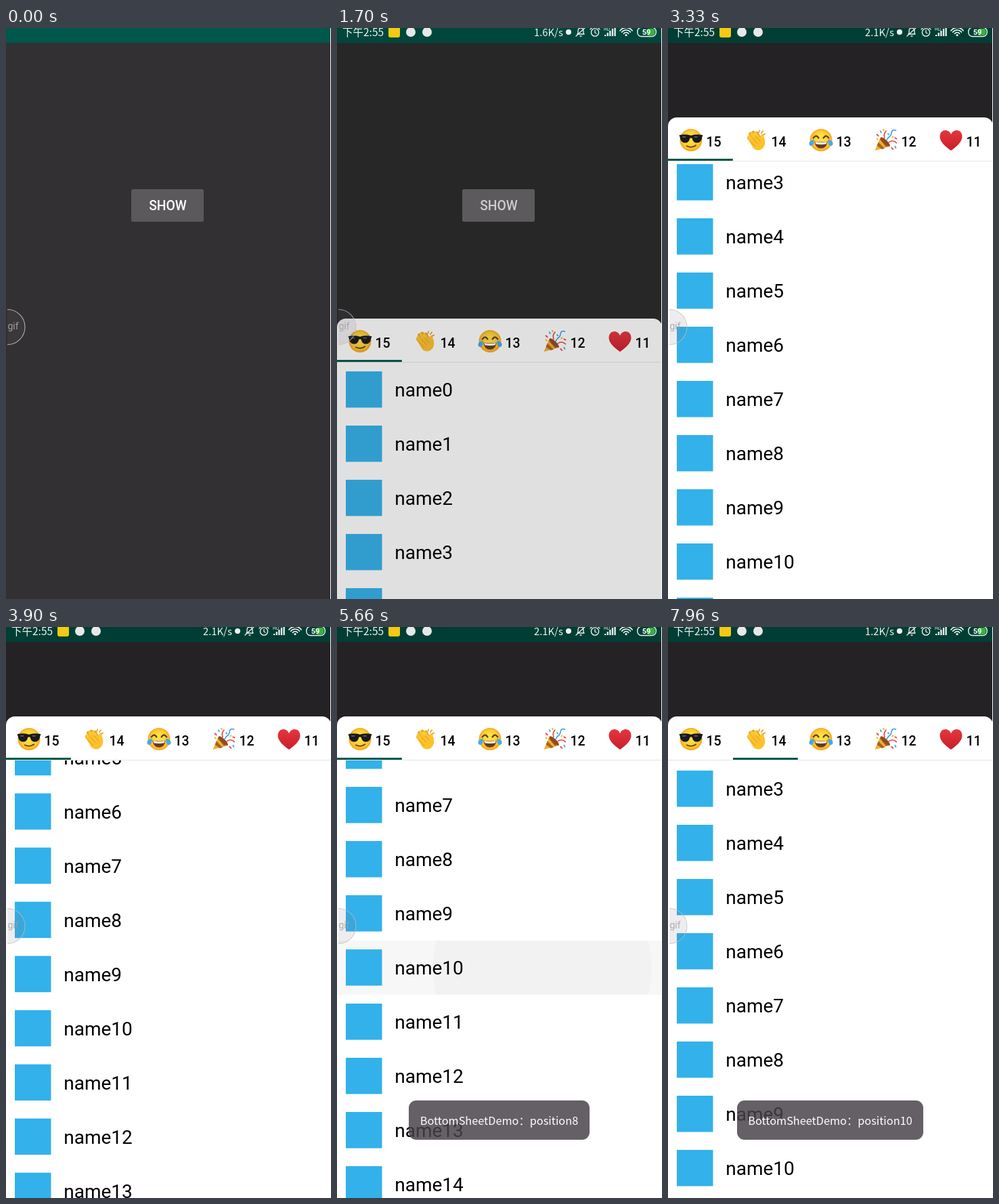
These frames come from a looping animation (480x843 px, 8 s). An HTML page with a canvas:

```html
<!DOCTYPE html>
<html lang="en">
<head>
<meta charset="utf-8">
<title>Bottom sheet demo</title>
<style>
html, body { margin: 0; width: 100%; height: 100%; overflow: hidden; background: #323032; }
canvas { display: block; width: 480px; height: 843px; }
</style>
</head>
<body>
<canvas id="stage"></canvas>
<script>
const W = 480, H = 843, LOOP = 8000;
const canvas = document.getElementById('stage');
const dpr = window.devicePixelRatio || 1;
canvas.width = W * dpr;
canvas.height = H * dpr;
const c = canvas.getContext('2d');

const ROBOTO = 'Roboto, sans-serif';
const CJK = '"Noto Sans CJK SC", "Noto Sans CJK", "Noto Sans", sans-serif';
const BG = '#323032', PRIMARY = '#00574b', DIM = 0.29;
const HEADER = 65, ROW = 80, ROWS = 15;
const COUNTS = [15, 14, 13, 12, 11];

const clamp = (x, a = 0, b = 1) => Math.min(b, Math.max(a, x));
const ramp = (t, a, b) => clamp((t - a) / (b - a));
const smooth = x => x * x * (3 - 2 * x);

// Eased value through [time, value] stops
function track(t, stops) {
  if (t <= stops[0][0]) return stops[0][1];
  for (let i = 1; i < stops.length; i++) {
    const [t0, v0] = stops[i - 1], [t1, v1] = stops[i];
    if (t < t1) return v0 + (v1 - v0) * smooth((t - t0) / (t1 - t0));
  }
  return stops[stops.length - 1][1];
}

function rect(x, y, w, h, fill) {
  c.fillStyle = fill;
  c.fillRect(x, y, w, h);
}
function round(x, y, w, h, r, fill) {
  c.beginPath();
  c.roundRect(x, y, w, h, r);
  if (fill) { c.fillStyle = fill; c.fill(); }
}
function disc(x, y, r, fill) {
  c.beginPath();
  c.arc(x, y, r, 0, Math.PI * 2);
  c.fillStyle = fill;
  c.fill();
}
function shape(d, fill) {
  c.fillStyle = fill;
  c.fill(new Path2D(d));
}
function line(d, color, width) {
  c.strokeStyle = color;
  c.lineWidth = width;
  c.lineCap = c.lineJoin = 'round';
  c.stroke(new Path2D(d));
}
function text(s, x, y, font, fill, align = 'left') {
  c.font = font;
  c.fillStyle = fill;
  c.textAlign = align;
  c.fillText(s, x, y);
}
function layer(draw) {
  c.save();
  draw();
  c.restore();
}

function face() {
  const g = c.createRadialGradient(0, -3, 4, 0, 0, 16.5);
  g.addColorStop(0, '#ffe045');
  g.addColorStop(0.65, '#fdca2f');
  g.addColorStop(1, '#f2a01e');
  disc(0, 0, 16, g);
}

// Each emoji is drawn around its own centre
const EMOJI = [
  function shades() {
    face();
    shape('M-17-7Q-8-9 0-6.5Q8-9 17-7L16-4.5Q15 4 8.500 4Q3 4 1.500-3L-1.500-3Q-3 4-8.500 4Q-15 4-16-4.500Z', '#17191c');
    line('M-12-4.500L-8-4.500M5-4.500L9-4.500', '#596068', 1.5);
    line('M-6 8.500Q1 12 7 7.500', '#6b3f16', 1.8);
  },
  function clap() {
    line('M-8-9L-2 2M-4-11L3 0M1-10L6-1M-10-3L-4 5', '#eda51c', 5);
    line('M-10-5L-2 6M-6-9L3 4M-1-9L7 2M9-6L9 4', '#fcc832', 4.6);
    shape('M-11-1L-3-6L12-3Q15 8 8 13Q0 17-5 10Z', '#fcc22c');
    line('M-9 1L-1 9M-5-3L2 5M0-5L6 2', '#dd9418', 0.9);
    line('M5-14L4-11M10-13L7.500-10M13-9L10-7.500', '#e59a23', 1.5);
  },
  function joy() {
    face();
    line('M-11-3Q-7-9-3.500-3M3.500-3Q7-9 11-3', '#653c17', 2.2);
    shape('M-9.500 2Q0 4 9.500 2Q8 12 0 12Q-8 12-9.500 2Z', '#6d3922');
    shape('M-8.500 2.500Q0 4.500 8.500 2.500L7.500 5.500Q0 7-7.500 5.500Z', '#fff');
    shape('M-10-1Q-18 1-17 6Q-15 10-11.500 7Q-9.500 4-10-1ZM10-1Q18 1 17 6Q15 10 11.500 7Q9.500 4 10-1Z', '#43a9ed');
  },
  function popper() {
    shape('M-16 15L-8-4Q2 0 6 9Z', '#f3ae2d');
    shape('M-13 8L-11 3L-2 12L-6 13ZM-9-1L-7-4L4 8L0 10Z', '#a96320');
    c.beginPath();
    c.ellipse(-1, 2.5, 2.8, 9, -0.8, 0, Math.PI * 2);
    c.fillStyle = '#8b4c22';
    c.fill();
    line('M-2-3Q-4-9 0-13M4 3Q10-1 15 4', '#e9483f', 1.6);
    line('M1 0Q3-4 5-5T8-11T14-14', '#3d9ee5', 1.6);
    line('M-13-8L-11-6M8 11L10 13M13-3L15-2', '#f04f51', 2);
    line('M-8-13L-7-11M13 9L14 11M3-9L4-8', '#48b6e8', 2);
    line('M-4-15L-3-14M9-4L10-5M-13-2L-12-1', '#f5b62e', 2);
  },
  function heart() {
    const g = c.createLinearGradient(0, -14, 0, 15);
    g.addColorStop(0, '#e5363d');
    g.addColorStop(1, '#c81e2b');
    shape('M0 15C-9 9-16 2-16-5C-16-16-3-17 0-8C3-17 16-16 16-5C16 2 9 9 0 15Z', g);
  }
];

function statusIcons(t) {
  const white = '#f2f4f2';
  const speed = t < 1980 ? '1.6K/s' : t < 6430 ? '2.1K/s' : '1.2K/s';
  text('下午2:55', 8, 12, '15.5px ' + CJK, white);
  round(76, -3, 17, 17, 3, '#f5c914');
  disc(109, 6, 7, '#e6e9e7');
  disc(133, 6, 7, '#e6e9e7');
  text(speed, 291, 12, '14.8px ' + CJK, white);
  disc(342, 6, 4, white);
  // Muted bell
  line('M355 9L365 9L364 7L364 4Q364 0 360 0Q356 0 356 4L356 7ZM359 12L361 12M353 12L367-1', white, 1.3);
  // Alarm
  c.beginPath();
  c.arc(381, 6.5, 5.6, 0, Math.PI * 2);
  c.strokeStyle = white;
  c.lineWidth = 1.4;
  c.stroke();
  line('M381 3.500L381 7L383 8M374 2L377-0.500M388 2L385-0.500', white, 1.3);
  // Signal
  text('HD', 394, 4, '6.5px ' + ROBOTO, white);
  for (let i = 0; i < 5; i++) rect(395 + i * 3.6, 10 - i * 3, 2.3, 2 + i * 3, white);
  // Wireless
  for (const r of [4.5, 8, 11.5]) {
    c.beginPath();
    c.arc(427, 11, r, -Math.PI * 0.79, -Math.PI * 0.21);
    c.lineWidth = 1.7;
    c.stroke();
  }
  disc(427, 10.5, 1.6, white);
  // Battery
  round(457, 1, 12.5, 10, 4, '#36b53c');
  round(443.7, -0.8, 27.5, 13.3, 6);
  c.strokeStyle = white;
  c.lineWidth = 1.4;
  c.stroke();
  text('59', 457, 10, 'bold 11px ' + ROBOTO, '#fff', 'center');
}

function showButton(t) {
  const press = ramp(t, 1120, 1230) * (1 - ramp(t, 1680, 1890));
  round(185, 238, 107, 48, 2.5, '#5b595b');
  if (press > 0) round(185, 238, 107, 48, 2.5, `rgba(255,255,255,${0.15 * press})`);
  text('SHOW', 239, 269, '500 19.3px ' + ROBOTO, '#fff', 'center');
}

// Touch feedback on a row: tint plus a growing circle
function ripple(t, y, start, end, fade, speed) {
  if (t < start || t > end) return;
  const a = ramp(t, start, start + 120) * (1 - ramp(t, end - fade, end));
  layer(() => {
    c.beginPath();
    c.rect(0, y, W, ROW);
    c.clip();
    c.globalAlpha = a;
    rect(0, y, W, ROW, 'rgba(0,0,0,.033)');
    disc(303, y + ROW / 2, 30 + (t - start) * speed, 'rgba(0,0,0,.018)');
  });
}

function list(x, top, scroll, t, touch) {
  for (let i = 0; i < ROWS; i++) {
    const y = top + i * ROW - scroll;
    if (y > H || y + ROW < top) continue;
    if (touch && i === 8) ripple(t, y, 4440, 5090, 250, 0.356);
    if (touch && i === 10) ripple(t, y, 5220, 6290, 200, 0.3);
    rect(x + 13, y + 13, 53.5, 53.5, '#33b1ea');
    text('name' + i, x + 85.2, y + 50, '28px ' + ROBOTO, '#000');
  }
}

function sheet(t) {
  const p = ramp(t, 1510, 1760);
  if (p <= 0) return;
  const alpha = 0.5 - Math.cos(p * Math.PI) / 2;
  const top = track(t, [[1840, 419.3], [2240, 132]]) + 168 * (1 - p) ** 2;
  const page = 1 - (1 - ramp(t, 6400, 6670)) ** 2;
  rect(0, 0, W, H, `rgba(0,0,0,${DIM * ramp(t, 1510, 1790)})`);

  layer(() => {
    round(0, top, W, H - top + 20, 13, '#fff');
    c.clip();
    layer(() => {
      c.beginPath();
      c.rect(0, top + HEADER, W, H);
      c.clip();
      if (page < 1) {
        const scroll = track(t, [[2180, 0], [2460, 269], [2640, 286], [3330, 249], [4240, 534]]);
        list(-page * W, top + HEADER, scroll, t, true);
      }
      if (t >= 6730) {
        list(0, top + HEADER, track(t, [[7430, 0], [7990, 240]]), t, false);
      }
    });
    rect(0, top + 64, W, 1, '#e2e6e2');
    COUNTS.forEach((n, i) => {
      layer(() => {
        c.translate(34 + i * 96, top + 33.5);
        c.scale(1.03, 1.03);
        EMOJI[i]();
      });
      text(n, 56.5 + i * 96, top + 43, '500 19.5px ' + ROBOTO, '#000');
    });
    rect(page * 96, top + 61, 95.8, 3, PRIMARY);
    // Entrance fade
    if (alpha < 1) {
      c.globalAlpha = 1 - alpha;
      rect(0, top, W, H - top, '#242324');
    }
  });
}

function toast(t, label, width, start, end) {
  if (t < start || t > end) return;
  const s = (t - start) / 1000;
  const y = 699 + 37 * Math.exp(-7.9 * s) * Math.cos(13.5 * s);
  layer(() => {
    c.globalAlpha = ramp(t, start, start + 125) * (1 - ramp(t, end - 230, end));
    round(239.5 - width / 2, y, width, 58, 11, 'rgba(72,66,72,.84)');
    text('BottomSheetDemo：' + label, 239.5, y + 36, '300 16.3px ' + CJK, '#fff', 'center');
  });
}

function bubble(t) {
  layer(() => {
    c.beginPath();
    c.rect(2, 410, 40, 64);
    c.clip();
    c.globalAlpha = 1 - 0.2 * ramp(t, 50, 370);
    disc(2, 441.5, 26, 'rgba(110,98,110,.15)');
    c.strokeStyle = 'rgba(185,192,185,.9)';
    c.lineWidth = 1.1;
    c.stroke();
    text('gif', 2.5, 445, '14px ' + ROBOTO, '#9c9f9c');
  });
}

function draw(t) {
  c.setTransform(dpr, 0, 0, dpr, 0, 0);
  rect(0, 0, W, H, BG);
  rect(0, 0, W, 22, PRIMARY);
  showButton(t);
  sheet(t);
  if (t >= 670) statusIcons(t);
  toast(t, 'position8', 267, 4480, 6590);
  toast(t, 'position10', 275, 6430, LOOP + 500);
  bubble(t);
  // Light strip along the right edge
  rect(W - 1, 0, 1, H, '#fff');
}

let origin;
function tick(now) {
  if (origin === undefined) origin = now;
  draw((now - origin) % LOOP);
  requestAnimationFrame(tick);
}
draw(0);
requestAnimationFrame(tick);
</script>
</body>
</html>
```
